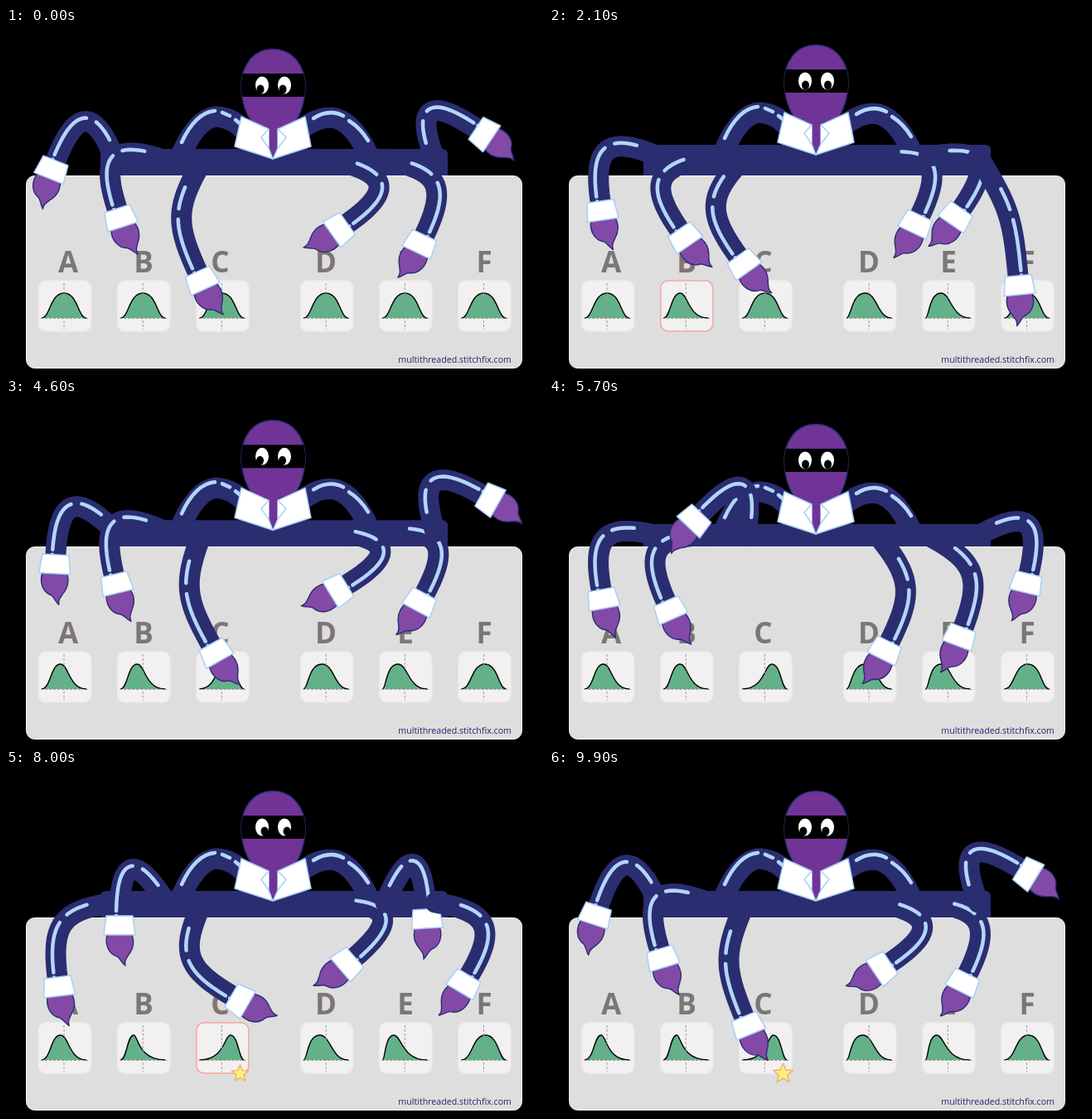
An HTML page for the animation above (10 s loop, 648 by 414 pixels).

```html
<!DOCTYPE html>
<html lang="en">
<head>
<meta charset="utf-8">
<title>Octopus at the slot machines</title>
<style>
  html, body { margin: 0; width: 100%; height: 100%; overflow: hidden; background: #000; }
  svg { display: block; width: 648px; height: 414px; }
  .label { font: 700 35px "Open Sans", "Noto Sans", sans-serif; fill: #7c7676; text-anchor: middle; paint-order: stroke; }
  .site { font: 10.65px "Open Sans", "Noto Sans", sans-serif; fill: #22246c; text-anchor: end; }
  .sleeve { fill: none; stroke: #2a2d70; stroke-width: 25; stroke-linecap: round; stroke-linejoin: round; }
  .stripe { fill: none; stroke: #b4d5fa; stroke-width: 4.5; stroke-linecap: round; }
  .cloth { fill: #fff; stroke: #a9cff6; stroke-width: 1.5; stroke-linejoin: round; }
  .hand { fill: #824aa6; stroke: #2a2d70; stroke-width: 1.4; stroke-linejoin: round; }
  .hill { fill: #63b188; stroke: #000; stroke-width: 1.4; stroke-linejoin: round; }
  .guide { stroke: #9a9a9a; stroke-width: 1; stroke-dasharray: 3 2; }
</style>
</head>
<body>
<svg id="stage" viewBox="0 0 648 414">
  <defs>
    <path id="skull" d="M322 25.5C346 25.5 361 46 361 70C361 92 354 107 346 119H300C291 107 284 92 284 70C284 46 298 25.5 322 25.5Z"/>
    <clipPath id="face"><use href="#skull"/></clipPath>
  </defs>
  <g id="body">
    <path class="sleeve" d="M208 162C220 128 238 106 256 107Q274 109 288 124"/>
    <path class="stripe" d="M212 138C222 116 236 101 252 100M261 102L270 106M277 111L283 116"/>
    <path class="sleeve" d="M352 126C368 112 384 106 398 109Q422 116 440 160"/>
    <path class="stripe" d="M371 109Q390 97 407 106M414 112Q428 121 437 136"/>
    <rect x="114" y="146" width="419" height="50" rx="6" fill="#2a2d70"/>
    <use href="#skull" fill="#703497" stroke="#2a2d70" stroke-width="1.5"/>
    <rect x="284" y="55" width="77" height="28" clip-path="url(#face)"/>
    <ellipse cx="309" cy="69" rx="8" ry="10.5" fill="#fff"/>
    <ellipse cx="336" cy="69" rx="8" ry="10.5" fill="#fff"/>
    <g id="pupils"><ellipse cx="309.5" cy="74" rx="4.5" ry="5.5"/><ellipse cx="336.5" cy="74" rx="4.5" ry="5.5"/></g>
    <path fill="#703497" d="M312 117H332L328 148L322 154L316 148Z"/>
    <path class="cloth" d="M284 107L317 122V145L322 158L276 143Z"/>
    <path class="cloth" d="M361 107L328 122V145L322 158L368 143Z"/>
    <path class="cloth" d="M317 122L308 132L317 145M328 122L338 132L328 145"/>
  </g>
  <rect x="24.5" y="178.5" width="598" height="232" rx="10" fill="#dedede" stroke="#f6f6f6"/>
  <g id="plots"></g>
  <path id="star" fill="#fdf07c" stroke="#f0a86c" stroke-width="1.3" stroke-linejoin="round"/>
  <text class="site" x="610" y="404.3">multithreaded.stitchfix.com</text>
  <g id="arms"></g>
</svg>
<script>
const LOOP = 10000, CYCLE = 5000, STEP = 100, HOLD = 450, STAR_AT = 7650;
const ARM = 147, ROOT_Y = 160;
const $ = id => document.getElementById(id);

function add(parent, tag, attrs) {
  const el = document.createElementNS("http://www.w3.org/2000/svg", tag);
  for (const k in attrs) el.setAttribute(k, attrs[k]);
  return parent.appendChild(el);
}

// Smooth closed curve through one value per beat
const beats = [0, 700, 2100, 3000, 3500];
function glide(values, t) {
  const n = beats.length;
  const time = i => beats[(i + n) % n] + Math.floor(i / n) * CYCLE;
  const value = i => values[(i + n) % n];
  const slope = i => (value(i + 1) - value(i - 1)) / (time(i + 1) - time(i - 1));
  const i = beats.filter(b => b <= t).length - 1;
  const h = time(i + 1) - time(i), u = (t - time(i)) / h, v = 1 - u;
  return v * v * (1 + 2 * u) * value(i) + u * u * (1 + 2 * v) * value(i + 1)
    + u * v * h * (v * slope(i) - u * slope(i + 1));
}

const bob = [0, 5, -5, 0, 3], gaze = [-2.5, 0, 0, 2.5, -2.5];

// Wrist positions at each beat; side 1 bends left, -1 bends right
const arms = [
  { root: 132, side: 1, x: [60, 63, 62, 62, 61], y: [160, 230, 209, 250, 300] },
  { root: 193, side: 1, x: [134, 141, 157, 137, 123], y: [218, 244, 243, 176, 198] },
  { root: 237, side: 1, x: [231, 184, 228, 272, 279], y: [294, 138, 275, 272, 242] },
  { root: 397, side: -1, x: [412, 411, 448, 421, 410], y: [236, 293, 226, 226, 212] },
  { root: 458, side: -1, x: [505, 500, 498, 507, 505], y: [250, 276, 218, 168, 192] },
  { root: 518, side: -1, x: [567, 579, 566, 559, 595], y: [121, 211, 299, 248, 150] }
];

// Each pull moves the hill closer to its final skew and spread
const plots = [
  { name: "A", tx: 75, skew: -11, spread: 5, first: 3600 },
  { name: "B", tx: 166, skew: -17, spread: 4, first: 2000 },
  { name: "C", tx: 258.5, skew: 13, spread: 8, first: 2650, every: 2500 },
  { name: "D", tx: 386, skew: -12, spread: 14, first: 750 },
  { name: "E", tx: 482, skew: -21, spread: 10, first: 800 },
  { name: "F", tx: 577, skew: 3, spread: 15, first: 2300 }
];

plots.forEach((p, i) => {
  p.x = 71 + 95.2 * i + (i > 2 ? 30.5 : 0);
  p.label = add($("plots"), "text", { class: "label", x: p.tx, y: 295, "stroke-width": 2 });
  p.label.textContent = p.name;
  p.box = add($("plots"), "rect", { x: p.x - 31.5, y: 305, width: 63, height: 61, rx: 9, fill: "#f2f0f1", "stroke-width": 1.5 });
  p.hill = add($("plots"), "path", { class: "hill" });
  add($("plots"), "path", { class: "guide", d: `M${p.x - 1} 308V364M${p.x - 29} 350.5H${p.x + 28}` });
});

for (const a of arms) {
  a.sleeve = add($("arms"), "path", { class: "sleeve" });
  a.stripe = add($("arms"), "path", { class: "stripe", "stroke-dasharray": "0 6 62 13 27 300" });
  a.end = add($("arms"), "g", {});
  add(a.end, "path", { class: "hand", d: "M-14 20C-19 34-13 46-3 49C1 51 2 56 7 60C6 54 8 52 11 47C18 38 18 29 14 20Z" });
  add(a.end, "path", { class: "cloth", d: "M-16 0H16L19 23H-19Z" });
}

const line = pts => "M" + pts.map(p => p[0].toFixed(2) + " " + p[1].toFixed(2)).join("L");

// An arm keeps its length: the nearer the wrist, the further it bows outwards
function drawArm(a, t, dy) {
  const s = [a.root, ROOT_Y + dy], e = [glide(a.x, t), glide(a.y, t)];
  const dx = e[0] - s[0], dyy = e[1] - s[1], d = Math.hypot(dx, dyy);
  const bow = Math.max(12, .37 * Math.sqrt(Math.max(0, ARM * ARM - d * d)));
  const out = [-dyy / d * a.side, dx / d * a.side], k = .25 + .2 * d / ARM;
  const bend = f => [0, 1].map(i => s[i] + (e[i] - s[i]) * f + out[i] * bow * 4 / 3);
  const c1 = bend(k), c2 = bend(1 - k);
  const mid = [], edge = [];
  for (let i = 24; i >= 0; i--) {
    const u = i / 24, v = 1 - u;
    const [x, y] = [0, 1].map(j => v * v * v * s[j] + 3 * v * v * u * c1[j] + 3 * v * u * u * c2[j] + u * u * u * e[j]);
    const [tx, ty] = [0, 1].map(j => v * v * (c1[j] - s[j]) + 2 * v * u * (c2[j] - c1[j]) + u * u * (e[j] - c2[j]));
    const shift = 4 * a.side / (Math.hypot(tx, ty) || 1);
    mid.push([x, y]);
    edge.push([x - ty * shift, y + tx * shift]);
  }
  a.sleeve.setAttribute("d", line(mid));
  a.stripe.setAttribute("d", line(edge));
  const turn = Math.atan2(e[1] - c2[1], e[0] - c2[0]) * 180 / Math.PI - 90;
  a.end.setAttribute("transform", `translate(${e}) rotate(${turn}) scale(${a.side} 1)`);
}

function drawPlot(p, t) {
  const every = p.every || CYCLE, since = t - p.first;
  const pulls = Math.max(0, Math.floor(since / every) + 1), learned = 1 - .6 ** pulls;
  const peak = p.x - 1 + p.skew * learned, half = 16 + (p.spread - 16) * learned;
  const foot = [p.x - 28, p.x + 26];
  const [l, r] = foot.map(x => peak + (x - peak) * (8 * Math.min(.7, half / Math.abs(x - peak)) - 1) / 6);
  p.hill.setAttribute("d", `M${foot[0]} 350C${l} 350 ${l} 320 ${peak} 320C${r} 320 ${r} 350 ${foot[1]} 350`);
  const lit = since >= 0 && since % every < HOLD;
  p.box.setAttribute("stroke", lit ? "#f3a79f" : "#f1eaea");
  p.label.setAttribute("stroke", lit ? "#efc4c0" : "none");
}

function drawStar(t) {
  const size = 11.5 - Math.cos((t - 8000) / 1900 * Math.PI) * .9;
  const pts = Array.from({ length: 10 }, (_, i) => {
    const r = i % 2 ? size * .45 : size, w = i * Math.PI / 5 - Math.PI / 2;
    return [282.5 + r * Math.cos(w), 366.5 + r * Math.sin(w)];
  });
  $("star").setAttribute("d", line(pts) + "Z");
  $("star").setAttribute("visibility", t >= STAR_AT ? "visible" : "hidden");
}

function draw(now) {
  const t = Math.floor(now % LOOP / STEP) * STEP, c = t % CYCLE;
  const dy = glide(bob, c);
  $("body").setAttribute("transform", `translate(0 ${dy})`);
  $("pupils").setAttribute("transform", `translate(${glide(gaze, c)} 0)`);
  arms.forEach(a => drawArm(a, c, dy));
  plots.forEach(p => drawPlot(p, t));
  drawStar(t);
}

const start = performance.now();
function tick() {
  draw(performance.now() - start);
  requestAnimationFrame(tick);
}
tick();
</script>
</body>
</html>
```
